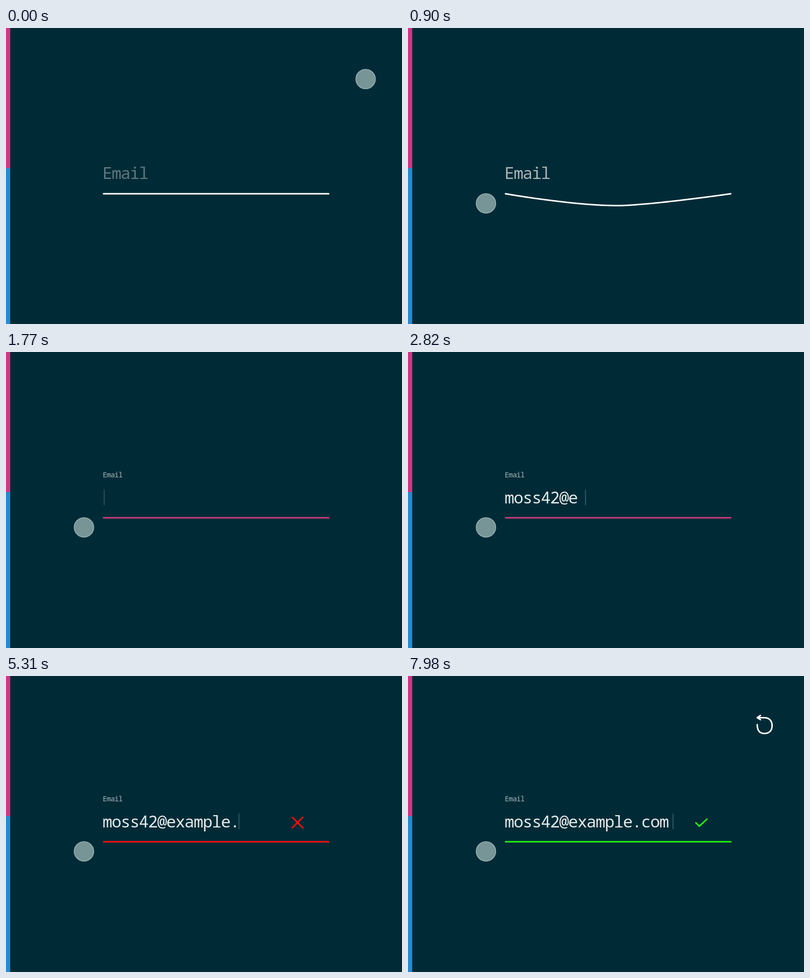
Recreate the animation shown at these times as an HTML page. Size 800 by 600 pixels, loop 8 s.

```html
<!DOCTYPE html>
<html lang="en">
<head>
<meta charset="utf-8">
<title>Email field</title>
<style>
  html, body { margin: 0; width: 100%; height: 100%; overflow: hidden; background: #002b36; }
  svg { display: block; width: 800px; height: 600px; }
  text { font: 33px "Noto Sans Mono", monospace; letter-spacing: -1.4px; white-space: pre; }
  .stroke { fill: none; stroke-width: 3; stroke-linecap: round; stroke-linejoin: round; }
</style>
</head>
<body>
<svg viewBox="0 0 800 600">
  <rect width="8.5" height="284" fill="#d33682"/>
  <rect y="284" width="8.5" height="316" fill="#268bd2"/>
  <text id="label" fill="#fff">Email</text>
  <text id="value" x="195" y="307" fill="#e6eaea"></text>
  <rect id="caret" y="279" width="2.5" height="31.5"/>
  <path id="line" class="stroke"/>
  <g id="cross" class="stroke" stroke="#ff0f0f">
    <path pathLength="1" d="M578.5 286.5L599.5 307.5"/>
    <path pathLength="1" d="M599.5 286.5L578.5 307.5"/>
  </g>
  <path id="check" class="stroke" stroke="#25fa0b" pathLength="1" d="M581.5 297.5L588.5 304.5L604 290"/>
  <g id="replay" class="stroke" stroke="#fff">
    <path pathLength="1" d="M706 84.5H720C730 84.5 735.5 91 735.5 100.500C735.5 110.500 730 116.500 720 116.500C711 116.500 705.500 111 705.500 98.500"/>
    <path pathLength="1" d="M712 80L705.500 84.500L712 88.500"/>
  </g>
  <circle id="pointer" r="19.7" fill="#779597" stroke="#98b1b2" stroke-width="1.6"/>
</svg>
<script>
const DURATION = 8000;
const TYPO = "moss42@examplr.cpm";
const FIXED = "moss42@example.com";
const WHITE = [255, 255, 255], PINK = [211, 54, 130], RED = [255, 15, 15], GREEN = [37, 250, 11];

const el = Object.fromEntries([...document.querySelectorAll("[id]")].map(node => [node.id, node]));
const set = (node, attrs) => Object.entries(attrs).forEach(([key, v]) => node.setAttribute(key, v));
const mix = (a, b, p) => a + (b - a) * p;
const mixColor = (a, b, p) => a.map((v, i) => mix(v, b[i], p));
const rgb = color => `rgb(${color.map(Math.round)})`;
const linear = p => p;
const smooth = p => p * p * (3 - 2 * p);
const cubicInOut = p => p < .5 ? 4 * p ** 3 : 1 - 4 * (1 - p) ** 3;
const progress = (t, start, end, ease = smooth) => ease(Math.min(1, Math.max(0, (t - start) / (end - start))));
const bezier = (a, b, c, d, p) => {
  const q = 1 - p;
  return a * q ** 3 + 3 * b * q * q * p + 3 * c * q * p * p + d * p ** 3;
};

// Value at time t from [time, value] pairs.
function track(t, keys, ease = smooth) {
  const next = keys.findIndex(([time]) => time > t);
  if (next < 0) return keys.at(-1)[1];
  if (next === 0) return keys[0][1];
  const [t0, v0] = keys[next - 1], [t1, v1] = keys[next];
  return mix(v0, v1, ease((t - t0) / (t1 - t0)));
}

function reveal(node, amount) {
  set(node, { "stroke-dasharray": `${amount} 2`, visibility: amount > 0 ? "visible" : "hidden" });
}

function drawPointer(t) {
  const p = progress(t, 195, 850, cubicInOut);
  set(el.pointer, {
    cx: bezier(726.5, 500, 60, 157.5, p),
    cy: bezier(103.5, 310, 355.5, 355.5, p)
  });
}

function drawLine(t) {
  const sag = track(t, [
    [600, 0], [880, 26], [1005, 0], [1090, -6], [1230, 0],
    [3180, 0], [3260, 4], [3400, 0], [5830, 0], [5920, 4], [6080, 0]
  ]);
  let color = mixColor(WHITE, PINK, progress(t, 1080, 1450));
  color = mixColor(color, RED, progress(t, 3180, 3400));
  color = mixColor(color, GREEN, progress(t, 5830, 6100));
  const y = 336, dip = y + sag;
  set(el.line, {
    d: `M197 ${y}C197 ${y} 335 ${dip} 420 ${dip}C485 ${dip} 652 ${y} 652 ${y}`,
    stroke: rgb(color)
  });
}

function drawLabel(t) {
  const p = progress(t, 1050, 1480, cubicInOut);
  set(el.label, {
    transform: `translate(${mix(195, 195.5, p)} ${mix(306, 254, p)}) scale(${mix(1, .433, p)})`,
    opacity: mix(.36, .66, progress(t, 560, 850))
  });
}

function drawValue(t) {
  const typed = Math.floor(18 * progress(t, 2300, 3390, linear));
  const removed = Math.floor(5 * progress(t, 4150, 4880, linear));
  const retyped = Math.floor(5 * progress(t, 4950, 5700, linear));
  el.value.textContent = t < 4950 ? TYPO.slice(0, typed - removed) : FIXED.slice(0, 13 + retyped);
}

function drawCaret(t) {
  const x = track(t, [
    [2300, 198.5], [3390, 533.5], [4150, 533.5], [4880, 438.5],
    [4950, 438.5], [5310, 470.5], [5700, 535.5]
  ], linear);
  const glow = .5 - .5 * Math.cos((t - 3600) / 900 * 2 * Math.PI);
  set(el.caret, {
    x: x - 1.25,
    fill: rgb(mixColor([36, 72, 81], [48, 138, 144], glow)),
    opacity: progress(t, 1450, 1700)
  });
}

function drawIcons(t) {
  const [down, up] = el.cross.children;
  reveal(down, progress(t, 3300, 3440));
  reveal(up, progress(t, 3390, 3540));
  set(el.cross, { opacity: 1 - progress(t, 5690, 5850) });
  reveal(el.check, progress(t, 5900, 6200));
  const [ring, head] = el.replay.children;
  reveal(ring, progress(t, 7370, 7960));
  reveal(head, progress(t, 7370, 7600));
}

function render(now) {
  const t = now % DURATION;
  [drawPointer, drawLine, drawLabel, drawValue, drawCaret, drawIcons].forEach(draw => draw(t));
  requestAnimationFrame(render);
}
render(performance.now());
</script>
</body>
</html>
```
